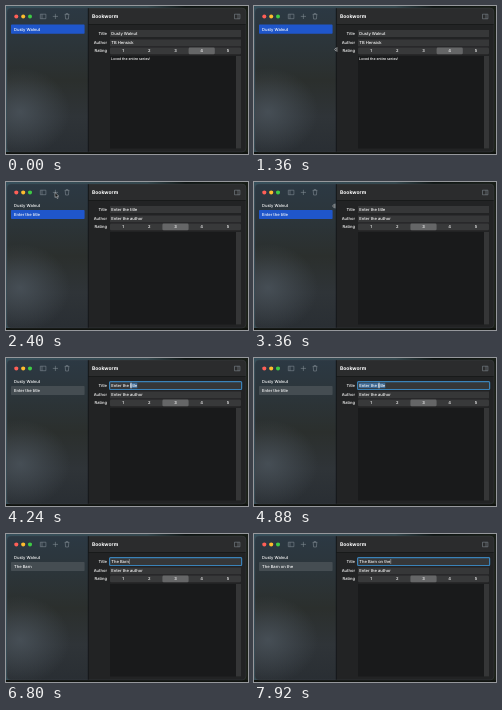
An HTML page for the animation above (8000 ms loop, 242 by 148 pixels).

```html
<!DOCTYPE html>
<html lang="en">
<head>
<meta charset="utf-8">
<title>Book list</title>
<style>
  html, body { margin: 0; width: 100%; height: 100%; overflow: hidden; background: #0c1110; }
  svg { display: block; width: 100vw; height: 100vh; }
  text { font: 500 4.1px Inter, sans-serif; fill: #fff; text-rendering: geometricPrecision; }
  .label { text-anchor: end; }
  .digit { text-anchor: middle; }
  .title { font-size: 5px; font-weight: 700; }
  .icon { fill: none; stroke: #8d979e; stroke-width: .5; }
  .field { fill: #363738; }
</style>
</head>
<body>
<svg viewBox="0 0 242 148">
  <defs>
    <linearGradient id="desk" x2="1" y2=".25">
      <stop stop-color="#36505c"/><stop offset=".55" stop-color="#34484e"/>
      <stop offset=".7" stop-color="#0d1412"/><stop offset="1" stop-color="#1b2018"/>
    </linearGradient>
    <linearGradient id="side" x2="0" y2="1">
      <stop stop-color="#2c3944"/><stop offset=".25" stop-color="#2c353a"/>
      <stop offset=".5" stop-color="#2b2f2d"/><stop offset=".75" stop-color="#2f3438"/><stop offset="1" stop-color="#292e33"/>
    </linearGradient>
    <radialGradient id="glow">
      <stop stop-color="#4c555d" stop-opacity=".8"/><stop offset="1" stop-color="#4c555d" stop-opacity="0"/>
    </radialGradient>
    <clipPath id="window"><rect x="1" y="2" width="239" height="144" rx="4"/></clipPath>
  </defs>

  <rect width="242" height="148" fill="url(#desk)"/>
  <rect y="146" width="242" height="2" fill="#10130f"/>
  <g clip-path="url(#window)">
    <rect width="83" height="148" fill="url(#side)"/>
    <ellipse cx="14" cy="106" rx="50" ry="44" fill="url(#glow)"/>
    <rect x="82.5" width="160" height="148" fill="#222324"/>
    <rect x="82.5" width="160" height="18.5" fill="#2b2c2d"/>
    <path d="M82.5 18.5H240" stroke="#101112" stroke-width=".6"/>
    <path d="M82.3 2V146" stroke="#0c0e10" stroke-width=".7"/>
  </g>
  <rect x="1" y="2" width="239" height="144" rx="4" fill="none" stroke="#4a4f51" stroke-width=".3"/>

  <circle cx="10.3" cy="10.4" r="2" fill="#ff5f57"/>
  <circle cx="17.2" cy="10.4" r="2" fill="#febc2e"/>
  <circle cx="24" cy="10.4" r="2" fill="#3ecb45"/>
  <g class="icon">
    <path d="M34.3 8.2h5.6v4.5h-5.6zM36 8.2v4.5M46.8 10.4h5.2M49.4 7.8v5.2"/>
    <path d="M58.7 8.4h4.6M60.2 8.4v-.9h1.6v.9M59.2 8.4l.4 4.6h2.8l.4-4.6"/>
    <path d="M228.5 8.2h5.4v4.6h-5.4zM232 8.2v4.6"/>
  </g>
  <text class="title" x="86" y="12.2">Bookworm</text>

  <rect id="row" x="5" width="73.6" height="9.2" rx=".8"/>
  <text x="8" y="24.7">Dusty Walnut</text>
  <text id="second" x="8" y="34"></text>

  <text class="label" x="101" y="28.9">Title</text>
  <text class="label" x="101" y="38.4">Author</text>
  <text class="label" x="101" y="46.3">Rating</text>
  <rect class="field" x="104" y="24" width="131" height="7"/>
  <rect class="field" x="104" y="33.5" width="131" height="6.8"/>
  <rect id="ring" x="103.6" y="23.6" width="132" height="7.9" rx=".9" fill="none" stroke="#3a82b8" stroke-width="1.2"/>
  <rect id="mark" y="24.8" height="5.4" fill="#3c6791"/>
  <text id="book" x="105.3" y="28.9"></text>
  <text id="author" x="105.3" y="38.4"></text>
  <path id="caret" d="M0 25v5" stroke="#e2e6ea" stroke-width=".4"/>

  <rect x="104" y="41.6" width="131" height="6.7" rx="1.3" fill="#38393a"/>
  <rect id="chosen" y="41.6" width="26.2" height="6.7" rx="1.3" fill="#656667"/>
  <g id="digits"></g>
  <rect x="104" y="50" width="131" height="92.5" fill="#191a1b"/>
  <rect x="230" y="50" width="5" height="92.5" fill="#353637"/>
  <text id="review" x="105" y="54" style="font-size:3.5px">Loved the entire series!</text>

  <path id="cursor" stroke-linejoin="round"/>
</svg>
<script>
const $ = id => document.getElementById(id);
const set = (id, attrs) => Object.entries(attrs).forEach(([k, v]) => $(id).setAttribute(k, v));
const show = (id, on) => set(id, { visibility: on ? "visible" : "hidden" });

const LOOP = 8000, STEP = 80;
const ADDED = 2320, FOCUSED = 4080, WORD = 4160, ALL = 4480, TYPING = 5840;
const phrase = "The Barn on the";
const keyTimes = [5840, 5920, 6080, 6240, 6400, 6560, 6640, 6800, 6880, 6960, 7040, 7120, 7280, 7440, 7600];

// time, x, y
const path = [
  [560, 126, 119], [1360, 82.5, 43.5], [1440, 82.5, 43.5], [2240, 49, 10.5],
  [2400, 49, 10.5], [3120, 73, 23], [3360, 80.5, 24], [3600, 119, 29],
  [3760, 119, 29], [3920, 125, 27.5], [5200, 125, 27.5], [5520, 127, 25.5]
];
const shapes = {
  arrow: "M0 0v5l1.2-1 1 2 .9-.4-1-1.9h1.7z",
  beam: "M-.9-2.5q.9 0 .9.7v3.6q0 .7-.9.7M.9-2.5q-.9 0-.9.7v3.6q0 .7.9.7",
  resize: "M-2 0l1.5-1.6v3.2zM.5-2.4v4.8"
};

for (let n = 1; n <= 5; n++) {
  $("digits").insertAdjacentHTML("beforeend",
    `<text class="digit" x="${90.9 + 26.2 * n}" y="46.4">${n}</text>`);
}

function cursorAt(t) {
  const next = path.findIndex(p => p[0] > t);
  if (next < 0) return path.at(-1).slice(1);
  const [t0, x0, y0] = path[Math.max(0, next - 1)], [t1, x1, y1] = path[next];
  const u = t1 === t0 ? 0 : (t - t0) / (t1 - t0);
  const eased = u * u * (3 - 2 * u);
  return [x0 + (x1 - x0) * eased, y0 + (y1 - y0) * eased];
}

function drawCursor(t) {
  show("cursor", t >= 560 && t < TYPING);
  const [x, y] = cursorAt(t);
  const kind = Math.abs(x - 82) < 3 ? "resize" : x > 100 ? "beam" : "arrow";
  const beam = kind === "beam";
  set("cursor", {
    d: shapes[kind], transform: `translate(${x} ${y})`,
    fill: beam ? "none" : "#111", stroke: "#d9dcde", "stroke-width": beam ? .6 : .5
  });
}

function draw(t) {
  const added = t >= ADDED, focused = t >= FOCUSED, typing = t >= TYPING;
  const typed = phrase.slice(0, keyTimes.filter(k => k <= t).length);
  const entry = typing ? typed : "Enter the title";
  $("second").textContent = added ? entry : "";
  $("book").textContent = added ? entry : "Dusty Walnut";
  $("author").textContent = added ? "Enter the author" : "TB Hensick";
  set("row", { y: added ? 27.9 : 18.6, fill: focused ? "#454d52" : "#1f56cb" });
  set("chosen", { x: added ? 156.4 : 182.6 });
  show("review", !added);
  show("ring", focused);

  const measure = n => n ? $("book").getSubStringLength(0, n) : 0;
  const marked = t >= WORD && !typing;
  const start = t < ALL ? measure(10) : 0;
  show("mark", marked);
  if (marked) set("mark", { x: 105.3 + start, width: measure(entry.length) - start });
  show("caret", typing);
  if (typing) set("caret", { transform: `translate(${105.6 + measure(typed.length)} 0)` });
  drawCursor(t);
}

const origin = performance.now();
function tick() {
  const t = (performance.now() - origin) % LOOP;
  draw(Math.floor(t / STEP) * STEP);
  requestAnimationFrame(tick);
}
tick();
</script>
</body>
</html>
```
